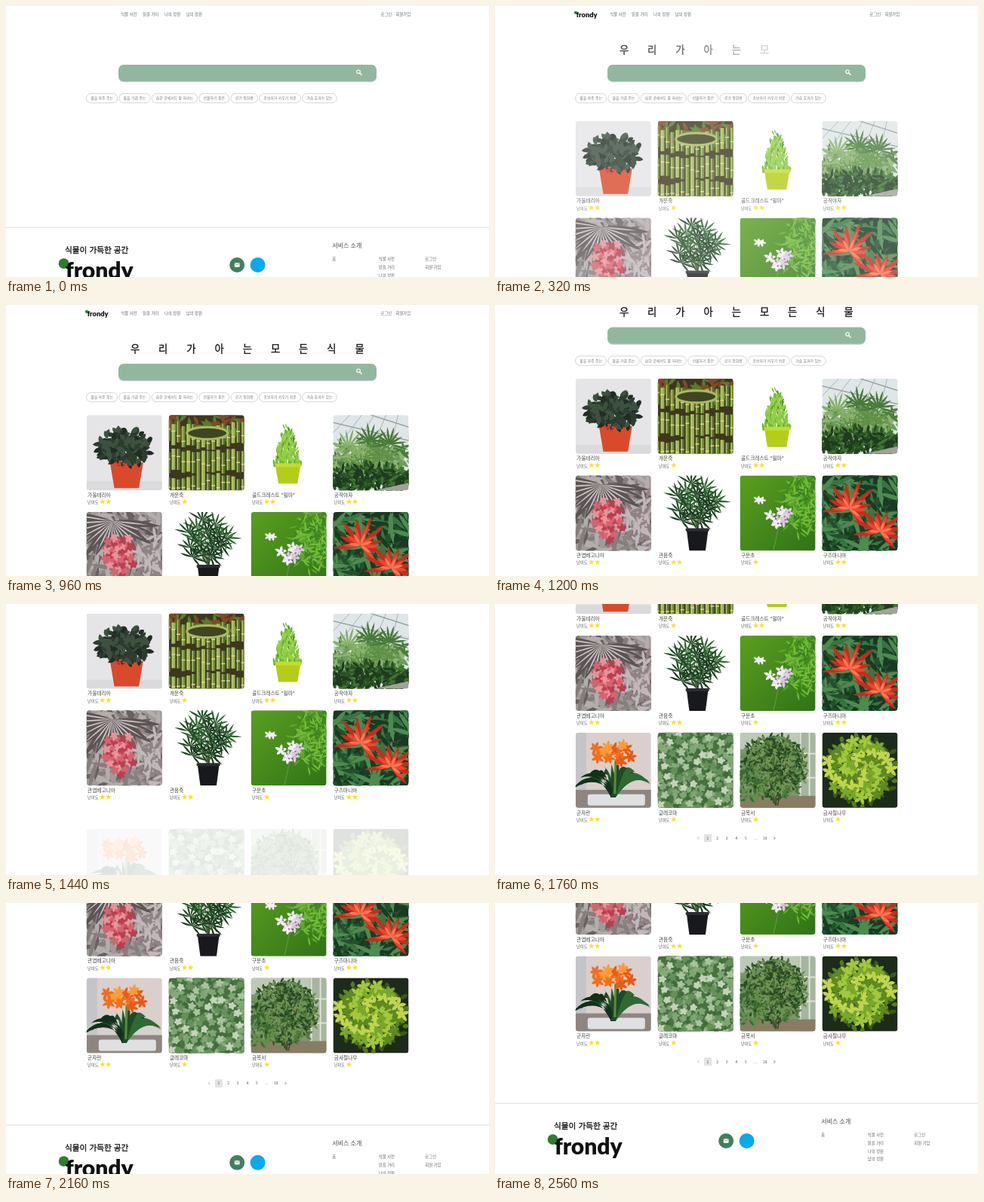
Recreate the animation shown at these times as an HTML page. Size 640 by 360 pixels, loop 2800 ms.

```html
<!DOCTYPE html>
<html lang="ko">
<head>
<meta charset="utf-8">
<title>식물 사전</title>
<style>
  html, body { margin: 0; width: 100%; height: 100%; overflow: hidden; background: #fff; }
  svg { display: block; width: 100vw; height: 100vh; }
  text { font-family: "Noto Sans CJK KR", "Noto Sans CJK", "Noto Sans", sans-serif; }
  .medium { stroke: #111; stroke-width: .3; }
  .logo { font-family: Lato, sans-serif; font-weight: 900; }
</style>
</head>
<body>
<svg id="stage" viewBox="0 0 640 360"></svg>
<script>
const LOOP = 2800, STEP = 80, LAST = 2560, LOADED = 80;

// Seeded random numbers
let seed = 11;
const rnd = () => {
  seed = (seed + 0x6D2B79F5) | 0;
  let t = Math.imul(seed ^ (seed >>> 15), 1 | seed);
  t = (t + Math.imul(t ^ (t >>> 7), 61 | t)) ^ t;
  return ((t ^ (t >>> 14)) >>> 0) / 4294967296;
};
const R = (a, b) => a + (b - a) * rnd();

// Shape helpers
const many = (n, f) => Array.from({ length: n }, (_, i) => f(i)).join('');
const rect = (x, y, w, h, fill, extra = '') =>
  `<rect x="${x}" y="${y}" width="${w}" height="${h}" fill="${fill}" ${extra}/>`;
const circle = (x, y, r, fill) => `<circle cx="${x}" cy="${y}" r="${r}" fill="${fill}"/>`;
const path = (d, fill) => `<path d="${d}" fill="${fill}"/>`;
const line = (d, color, w = 1) =>
  `<path d="${d}" fill="none" stroke="${color}" stroke-width="${w}" stroke-linecap="round"/>`;
// y is the middle of the text line
const text = (x, y, s, size, fill = '#666', extra = '') =>
  `<text x="${x}" y="${y + size * 0.37}" font-size="${size}" fill="${fill}" ${extra}>${s}</text>`;
const MID = 'text-anchor="middle"';

// Plant helpers
const bg = color => rect(0, 0, 100, 100, color);
const pot = (x, y, w, h, color) => path(`M${x} ${y}h${w}l${-w * 0.13} ${h}h${-w * 0.74}z`, color);
const leaf = (x, y, len, w, a) => {
  const c = Math.cos(a), s = Math.sin(a);
  const p = (u, v) => `${(x + u * c - v * s).toFixed(1)} ${(y + u * s + v * c).toFixed(1)}`;
  return `M${p(0, 0)}Q${p(len / 2, w)} ${p(len, 0)}Q${p(len / 2, -w)} ${p(0, 0)}`;
};
const fan = (x, y, n, len, w, from = 0, turn = 6.28) =>
  many(n, i => leaf(x, y, len * R(0.8, 1.15), w, from + turn * (i + 0.5) / n));
// Evenly spread places in an oval
const spots = (n, cx, cy, rx, ry, f) => many(n, i => {
  const r = Math.sqrt((i + 0.5) / n), a = i * 2.4;
  return f(cx + rx * r * Math.cos(a) + R(-2, 2), cy + ry * r * Math.sin(a) + R(-2, 2), i);
});
const bush = (n, cx, cy, rx, ry, len, w, colors) => many(3, () => colors.map(c =>
  path(many(Math.ceil(n / 3), () => {
    const a = R(0, 6.28), r = Math.sqrt(rnd());
    return leaf(cx + rx * r * Math.cos(a), cy + ry * r * Math.sin(a), len * R(0.7, 1.2), w, R(0, 6.28));
  }), c)).join(''));
const rosettes = (n, cx, cy, rx, ry, petals, len, w, colors) => spots(n, cx, cy, rx, ry, (x, y, i) =>
  path(fan(x, y, petals, len, w, R(0, 2)), colors[i % colors.length]));
const bloom = (x, y, len) => ['#c62c1e', '#e8482f', '#ff7752'].map((c, i) =>
  path(fan(x, y, 9 - 2 * i, len * (1 - i * 0.28), 6 - i, -3.5, 4.6), c)).join('');

const photos = [
  () => bg('#e5e5e8') + rect(0, 88, 100, 12, '#dadadd') + pot(31, 63, 44, 34, '#d94a2b') +
    bush(80, 50, 42, 32, 20, 12, 6, ['#202c24', '#2c3d2f', '#3d5140']) +
    spots(6, 43, 65, 7, 4, (x, y) => circle(x, y, 1.8, '#e33a26')),

  () => bg('#3d371d') + bush(30, 50, 10, 60, 16, 16, 5, ['#587c2c', '#7f4a25']) +
    many(3, tier => many(16, i => {
      const x = i * 6.6 - 3, y = 14 + tier * 30 + Math.abs(i - 8) * (tier - 1) + R(0, 6);
      return rect(x, y, 5, 28, ['#6d8a31', '#9cb454', '#59702c'][i % 3]) +
        rect(x + 1, y, 1.2, 28, '#bcc97a') + rect(x, y + R(8, 20), 5, 1.5, '#ded891');
    })) +
    '<ellipse cx="51" cy="24" rx="27" ry="8" fill="#3f4522" stroke="#aabb60" stroke-width="3"/>',

  () => bg('#fff') + ['#4a8f1d', '#73bc31', '#95d048'].map(c => path(many(110, () => {
    const y = 15 + 55 * Math.sqrt(rnd()), w = (y - 10) * 0.31;
    return leaf(48 + R(-w, w), y, 8, 2, R(-2.2, -0.9));
  }), c)).join('') + pot(32, 65, 34, 26, '#b4cd18') + rect(32, 64, 34, 5, '#c4dc2c', 'rx="1"'),

  () => bg('#dfe6e7') + many(6, i => line(`M${i * 22 - 10} 34L${i * 16 + 22} 0`, '#a8b3b0')) +
    line('M0 10L100 34M50 0L100 16', '#8f9b98', 1.3) +
    bush(90, 46, 62, 58, 26, 16, 4, ['#4b7d3b', '#6d9c56', '#8eb275']) +
    spots(7, 48, 48, 36, 24, (x, y, i) =>
      path(fan(x, y, 10, 24, 3, -3.5, 4), ['#5f9148', '#83b066', '#477a38'][i % 3])) +
    bush(130, 46, 86, 58, 16, 12, 4, ['#3f7433', '#294f24', '#1f3b1e']) +
    path('M55 100L100 90V100Z', '#a3a198'),

  () => bg('#a09a9a') + bush(50, 50, 50, 65, 60, 36, 6, ['#6a6061', '#b3adac', '#867d7d']) +
    path(fan(34, 12, 16, 58, 8, 0, 3.4), '#5d5354') + path(fan(34, 12, 16, 54, 2, 0, 3.4), '#c9c4c2') +
    bush(45, 88, 70, 20, 40, 18, 4, ['#8f8284', '#c0b8b9']) +
    rosettes(34, 44, 58, 20, 27, 5, 7, 4, ['#d8626e', '#e9929a', '#b6404e']),

  () => bg('#fff') + spots(16, 49, 38, 31, 27, (x, y, i) =>
    line(`M53 74Q52 60 ${x} ${y}`, '#36502a', 0.7) +
    path(fan(x, y, 8, 19, 2.4, x / 60 - 3.6, 4.2), ['#1f4a22', '#2f6530', '#183a1c'][i % 3])) +
    pot(38, 71, 29, 29, '#18191c') + rect(37, 70, 31, 4, '#2c2d31', 'rx="1"'),

  () => bg('url(#meadow)') + bush(80, 82, 36, 24, 42, 14, 2.5, ['#5ca92a', '#3d8421', '#75bb3a']) +
    line('M44 100Q50 78 52 58', '#64933a', 1.3) +
    rosettes(7, 53, 54, 15, 12, 5, 9, 4, ['#f4eef6', '#dccbe2']) +
    rosettes(2, 26, 31, 5, 2, 5, 6, 3, ['#f4eef6']) +
    spots(7, 53, 54, 15, 12, (x, y) => circle(x, y, 1.2, '#a966a0')),

  () => bg('#183820') + bush(60, 50, 50, 65, 60, 38, 6, ['#23502c', '#387541', '#183b22', '#4d8b50']) +
    bloom(36, 44, 37) + bloom(77, 75, 36),

  () => bg('#d9cfcd') + rect(0, 0, 14, 100, '#c5c4c8') + rect(0, 76, 100, 24, '#8f8580') +
    rect(16, 82, 76, 15, '#dfe0e2', 'rx="3"') +
    many(22, i => {
      const u = (i * 8 % 22) / 10.5 - 1, x = 50 + u * 54, y = 38 + Math.abs(u) * 26 + R(0, 14);
      return path(`M47 86Q${48 + u * 24} ${30 + R(0, 20)} ${x} ${y}Q${54 + u * 24} 52 53 86`,
        ['#1d4b24', '#2e6a31', '#12301a'][i % 3]);
    }) + line('M52 80L53 38', '#5d8a3b', 3) +
    rosettes(13, 51, 27, 29, 13, 6, 9, 4, ['#f26d1c', '#ff9a35', '#e85a14']),

  () => bg('#48723f') + bush(150, 50, 50, 72, 72, 9, 6, ['#6b9460', '#3e6b38', '#88aa7b']) +
    rosettes(110, 50, 50, 72, 72, 5, 6, 4, ['#a9c49d', '#668f5a', '#c3d3b8', '#7fa573']),

  () => bg('#7d9670') + rect(0, 0, 100, 22, '#bbcab5') + rect(78, 0, 22, 100, '#a7b59f') +
    line('M80 0V100M92 0V100M76 28H100M76 60H100', '#dce4d7', 2) + rect(0, 84, 100, 16, '#887c65') +
    line('M48 96L45 30M50 96L62 36M47 96L33 38', '#4b4029', 1.6) +
    bush(230, 45, 46, 42, 42, 8, 3, ['#365d2b', '#52793d', '#274922', '#709354']) +
    bush(50, 10, 68, 18, 22, 10, 3, ['#3b6a32', '#648d4c']),

  () => bg('#1d2b1a') + bush(90, 50, 50, 46, 43, 11, 6, ['#527b20', '#39591a']) +
    rosettes(60, 50, 48, 43, 40, 5, 10, 5, ['#78a82b', '#a3c83b', '#5d8a23', '#c0d54c']),
];

const plants = [
  ['가울테리아', 2], ['개운죽', 1], ['골드크레스트 *윌마*', 2], ['공작야자', 2],
  ['관엽베고니아', 2], ['관음죽', 2], ['구문초', 1], ['구즈마니아', 2],
  ['군자란', 2], ['글레코마', 1], ['금목서', 1], ['금사철나무', 1],
];

const star = (x, y) => path('M' + many(10, i => {
  const r = i % 2 ? 1.7 : 3.9, a = i * Math.PI / 5;
  return `${(x + r * Math.sin(a)).toFixed(2)} ${(y - r * Math.cos(a)).toFixed(2)} `;
}) + 'Z', '#fde11c');

const card = ([name, level], i) => `<g transform="translate(${106.8 + (i % 4) * 108.9} ${146.2 + (i >> 2) * 128.7})">
  <g clip-path="url(#round)">${photos[i]()}</g>
  ${text(1.3, 106.2, name, 6.67, '#444')}${text(1.3, 116, '난이도', 5.2, '#555')}
  ${many(level, k => star(21 + k * 8, 115.2))}</g>`;

const row = n => `<g class="row">${many(4, i => card(plants[n * 4 + i], n * 4 + i))}</g>`;

const logo = (x, base, size, extra = '') => `<g ${extra}>
  ${circle(x - size * 1.57, base - size * 0.66, size * 0.23, '#2f7d32')}
  <text class="logo" x="${x}" y="${base}" font-size="${size}" fill="#111" ${MID}>frondy</text></g>`;

// Each chip is as wide as its text plus padding
const chips = () => {
  let x = 106.5;
  return ['물을 자주 주는', '물을 가끔 주는', '습한 곳에서도 잘 자라는', '선물하기 좋은',
    '공기 정화용', '초보자가 키우기 쉬운', '가습 효과가 있는'].map(s => {
    const w = 12 + 4.9 * [...s].reduce((sum, c) => sum + (c === ' ' ? 0.224 : 0.92), 0);
    const chip = rect(x, 116.3, w, 12.4, '#fff', 'rx="6.2" stroke="#c9c9c9" stroke-width=".8"') +
      text(x + w / 2, 122.5, s, 4.9, '#777', MID);
    x += w + 2.1;
    return chip;
  }).join('');
};

const menu = ['식물 사전', '읽을 거리', '나의 정원', '남의 정원'];

const header = () =>
  logo(121.6, 15, 9.3, 'class="late"') +
  menu.map((s, i) => text(152.3 + i * 28.8, 11.5, s, 5.35)).join('') +
  text(496.6, 11.5, '로그인', 5.3) + text(516.6, 11.5, '회원가입', 5.3) +
  [...'우리가아는모든식물'].map((s, i) =>
    text(171 + i * 37.2, 58, s, 13.3, '#111', `class="letter medium" ${MID}`)).join('') +
  rect(149, 79.2, 342, 22, '#000', 'rx="7" opacity=".2"') + rect(149, 78, 342, 22, '#92b79f', 'rx="7"') +
  '<circle cx="467" cy="87.3" r="2.3" fill="none" stroke="#fff" stroke-width="1.1"/>' +
  line('M468.9 89.2L471.2 91.5', '#fff', 1.3) + chips();

const pager = () => `<g class="late">${rect(276.8, 538.4, 10.4, 10.8, '#e3e3e3', 'rx="1.3"')}
  ${['1', '2', '3', '4', '5', '...', '18'].map((s, i) =>
    text(281.9 + i * 12.65, 543.8, s, 5, '#555', MID)).join('')}
  ${line('M269.9 542.4l-1.4 1.4l1.4 1.4', '#999', 0.8)}${line('M369.8 542.4l1.4 1.4l-1.4 1.4', '#555', 0.8)}</g>`;

const links = (x, list) => list.map((s, i) => text(x, 641.3 + i * 10.7, s, 5.35)).join('');
const footer = () => `<g id="footer">${rect(0, 598.7, 640, 0.9, '#cfe0e0')}
  ${text(78, 629, '식물이 가득한 공간', 10.67, '#111', 'class="medium"')}
  ${logo(123.7, 667, 30)}
  ${circle(306.2, 649, 10, '#437f5d')}${rect(302.8, 646.3, 6.8, 5.4, '#fff', 'rx=".7"')}
  ${line('M303.6 647.3L306.2 649.1L308.8 647.3', '#437f5d', 0.7)}
  ${circle(333.6, 649, 10, '#08a9ee')}
  ${text(432.3, 623, '서비스 소개', 8, '#444')}
  ${links(432.3, ['홈'])}${links(493.8, menu)}${links(555.3, ['로그인', '회원 가입'])}</g>`;

const stage = document.getElementById('stage');
stage.innerHTML = `<defs>
  <clipPath id="round"><rect width="100" height="100" rx="4"/></clipPath>
  <linearGradient id="meadow" x2="1" y2="1"><stop stop-color="#5a9f1f"/><stop offset="1" stop-color="#2f7317"/></linearGradient>
  </defs><g id="page">${header()}${many(3, row)}${pager()}${footer()}</g>`;

// Paused animations, moved along by the clock
const anims = [];
const play = (el, frames, delay, duration, easing) => {
  const a = el.animate(frames, { delay, duration, easing, fill: 'both' });
  a.pause();
  anims.push(a);
};
const all = q => stage.querySelectorAll(q);

play(all('#page')[0], { transform: ['translateY(0)', 'translateY(-333px)'] },
  960, LAST - 960, 'cubic-bezier(.255,.1,.368,.9)');
play(all('#footer')[0], { transform: ['translateY(-305px)', 'translateY(0)'] }, 0, LOADED, 'step-end');
all('.late').forEach(el => play(el, { opacity: [0, 1] }, 0, LOADED, 'step-end'));
all('.letter').forEach((el, i) =>
  play(el, { opacity: [0, 1] }, LOADED + i * 40, 400, 'cubic-bezier(.5,1,.89,1)'));
all('.row').forEach((el, i) =>
  play(el, { opacity: [0, 1], transform: ['translateY(33.3px)', 'translateY(0)'] }, i < 2 ? 120 : 1390, 400, 'ease'));

const start = performance.now();
const tick = () => {
  const t = (performance.now() - start) % LOOP;
  const now = Math.min(LAST, Math.floor(t / STEP) * STEP);
  anims.forEach(a => { a.currentTime = now; });
  requestAnimationFrame(tick);
};
tick();
</script>
</body>
</html>
```
